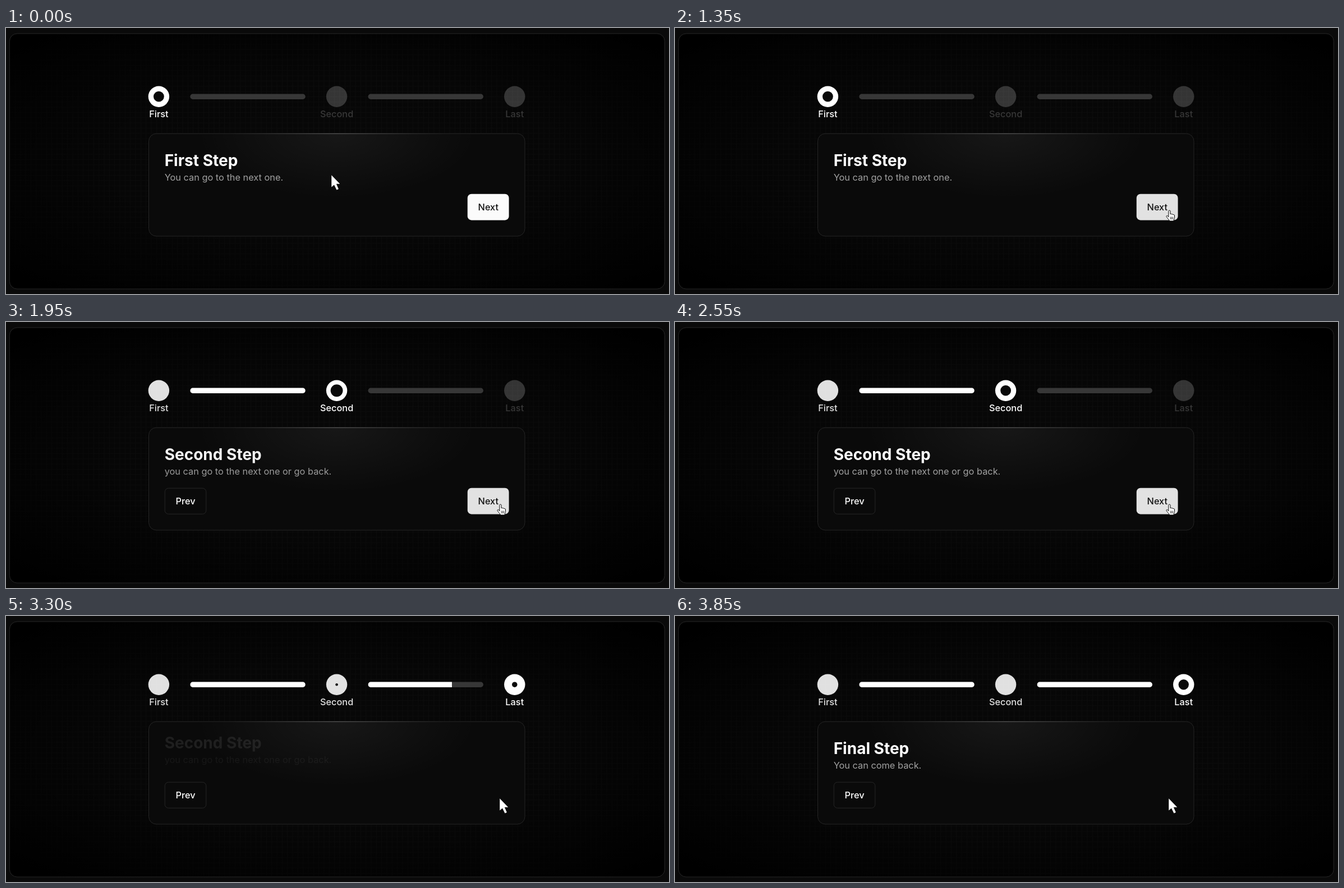
An HTML page for the animation above (3.9 s loop, 1182x474 px).

```html
<!DOCTYPE html>
<html lang="en">
<head>
<meta charset="utf-8">
<title>Stepper</title>
<style>
  html, body { margin: 0; width: 100%; height: 100%; overflow: hidden; background: #0a0a0a; }
  svg { display: block; width: 1182px; height: 474px; }
  text { font: 500 16.33px Inter, sans-serif; fill: #fff; }
  .mid { text-anchor: middle; }
  #title { font-size: 28px; font-weight: 700; }
  #note { font-weight: 400; fill: #a1a1a1; }
</style>
</head>
<body>
<svg viewBox="0 0 1182 474">
  <defs>
    <pattern id="grid" width="9.333" height="9.333" patternUnits="userSpaceOnUse" x="6.5" y="10">
      <path d="M.5 0V9.333M0 .5H9.333" stroke="#fff" stroke-opacity=".035"/>
    </pattern>
    <radialGradient id="vignette" cx=".5" cy=".5" r=".66">
      <stop offset="0" stop-opacity=".25"/>
      <stop offset=".5" stop-opacity=".4"/>
      <stop offset="1" stop-opacity="1"/>
    </radialGradient>
    <radialGradient id="glow" gradientUnits="userSpaceOnUse" cx="0" cy="0" r="1"
      gradientTransform="translate(589.7 188) scale(250 116)">
      <stop offset="0" stop-color="#fff" stop-opacity=".055"/>
      <stop offset="1" stop-color="#fff" stop-opacity="0"/>
    </radialGradient>
    <linearGradient id="shine">
      <stop offset="0" stop-color="#fff" stop-opacity="0"/>
      <stop offset=".5" stop-color="#fff" stop-opacity=".25"/>
      <stop offset="1" stop-color="#fff" stop-opacity="0"/>
    </linearGradient>
    <clipPath id="tracks">
      <rect x="328.3" y="117.6" width="205.5" height="9.3" rx="4.65"/>
      <rect x="645.5" y="117.6" width="205.5" height="9.3" rx="4.65"/>
    </clipPath>
  </defs>

  <rect width="1182" height="474" fill="#0a0a0a"/>
  <g id="panel">
    <rect x="6.3" y="10" width="1168" height="455" rx="13.5" fill="#0a0a0a"/>
    <rect x="6.3" y="10" width="1168" height="455" rx="13.5" fill="url(#grid)"/>
    <rect x="6.3" y="10" width="1168" height="455" rx="13.5" fill="url(#vignette)" stroke="#272727"/>
  </g>

  <g id="steps"></g>
  <g id="bars" clip-path="url(#tracks)">
    <rect x="320" y="116" width="540" height="13" fill="#373737"/>
  </g>

  <rect x="254.5" y="188.2" width="670.5" height="182.8" rx="13.5" fill="#0a0a0a"/>
  <rect x="254.5" y="188.2" width="670.5" height="182.8" rx="13.5" fill="url(#glow)" stroke="#252525"/>
  <rect x="400" y="187.7" width="380" height="1.2" fill="url(#shine)"/>

  <g id="copy">
    <text id="title" x="282.7" y="245.8"></text>
    <text id="note" x="282.7" y="271.7"></text>
  </g>
  <g id="prev">
    <rect x="283.2" y="296.2" width="73.6" height="46" rx="6.5" fill="#0a0a0a" stroke="#262626"/>
    <text class="mid" x="320" y="325.4">Prev</text>
  </g>
  <g id="next">
    <rect id="nextFace" x="822.8" y="295.7" width="73.8" height="46.7" rx="7"/>
    <text class="mid" x="859.8" y="325.4" style="fill:#111">Next</text>
  </g>

  <path id="arrow" d="M0 0V21.3L4.7 17.2 9.2 26.3 12.6 24.7 8.6 15.5H15Z" fill="#fff"/>
  <g id="hand" stroke="#000" stroke-linejoin="round" stroke-linecap="round">
    <path fill="#fff" d="M4.6 12V2.3a1.6 1.6 0 0 1 3.2 0V7.4a1.5 1.5 0 0 1 2.5.4
      1.5 1.5 0 0 1 2.5.7 1.5 1.5 0 0 1 2.4 1.2V13.5C15.2 16 13.8 17 13.7 19.6H6.3
      C5.9 17.4 3.2 15.6 1 12.2 0 10.5 1.8 9.4 3.2 10.7Z"/>
    <path d="M8 12.6V16.4M10.2 12.6V16.4M12.4 12.6V16.4" stroke-width=".8"/>
  </g>
</svg>
<script>
const LOOP = 3900, TICK = 50;
const CLICKS = [1583, 3170];
const LABELS = ["First", "Second", "Last"];
const CENTERS = [272.4, 589.6, 906.8];
const BAR_X = [328.3, 645.5], BAR_WIDTH = 205.5, DOT = 9.4;
const COPY = [
  ["First Step", "You can go to the next one."],
  ["Second Step", "you can go to the next one or go back."],
  ["Final Step", "You can come back."],
];
const WAITING = 0.19, DONE = 0.88;

const $ = id => document.getElementById(id);
const clamp = x => Math.min(1, Math.max(0, x));
const mix = (a, b, k) => a + (b - a) * k;

function add(parent, tag, attrs, text = "") {
  const el = document.createElementNS("http://www.w3.org/2000/svg", tag);
  for (const key in attrs) el.setAttribute(key, attrs[key]);
  el.textContent = text;
  return parent.appendChild(el);
}

// cubic-bezier(.25, .1, .25, 1), solved by bisection
function ease(x) {
  if (x <= 0 || x >= 1) return clamp(x);
  let lo = 0, hi = 1, s;
  for (let i = 0; i < 20; i++) {
    s = (lo + hi) / 2;
    const at = 0.75 * s * (1 - s) + s ** 3;
    if (at < x) lo = s; else hi = s;
  }
  return 0.3 * (1 - s) ** 2 * s + 3 * (1 - s) * s * s + s ** 3;
}
const tween = (t, start, duration) => ease((t - start) / duration);

// Springs take seconds: one overshoots, the other dies away
function spring(s) {
  if (s <= 0) return 0;
  const a = Math.sqrt(75) * s;
  return 1 - Math.exp(-5 * s) * (Math.cos(a) + Math.sin(a) / Math.sqrt(3));
}
const decay = s => s <= 0 ? 1 : (1 + 21 * s) * Math.exp(-21 * s);

const steps = LABELS.map((label, i) => {
  const group = add($("steps"), "g", {});
  add(group, "circle", { cx: CENTERS[i], cy: 122.2, r: 18.7, fill: "#fff" });
  const dot = add(group, "circle", { cx: CENTERS[i], cy: 122.2, fill: "#0a0a0a" });
  add(group, "text", { x: CENTERS[i], y: 158.8, class: "mid" }, label);
  return { group, dot };
});
const fills = BAR_X.map(x => add($("bars"), "rect", { x, y: 116, height: 13, fill: "#fff" }));

function show(id, visible) {
  $(id).style.display = visible ? "" : "none";
}

function drawSteps(t) {
  steps.forEach(({ group, dot }, i) => {
    const enter = i ? CLICKS[i - 1] : -LOOP;
    const leave = CLICKS[i] ?? Infinity;
    const lit = mix(WAITING, 1, tween(t, enter, 150));
    group.setAttribute("opacity", mix(lit, DONE, tween(t, leave, 150)));
    const size = spring((t - enter) / 1000) * decay((t - leave) / 1000);
    dot.setAttribute("r", size < 0.01 ? 0 : DOT * size);
  });
  fills.forEach((fill, i) => fill.setAttribute("width", BAR_WIDTH * tween(t, CLICKS[i], 300)));
}

function drawCopy(t) {
  const EXIT = 200, ENTER_DELAY = 220, SHIFT = 10.5;
  const index = CLICKS.filter(c => t >= c + EXIT).length;
  const enter = index ? tween(t, CLICKS[index - 1] + ENTER_DELAY, 200) : 1;
  const exit = index < 2 ? tween(t, CLICKS[index], EXIT) : 0;
  [$("title").textContent, $("note").textContent] = COPY[index];
  $("copy").setAttribute("opacity", enter * (1 - exit));
  $("copy").setAttribute("transform", `translate(0 ${SHIFT * (1 - enter - exit)})`);
}

function drawPointer(t) {
  const drift = tween(t, 0, 250);
  const k = clamp((t - 700) / 400), travel = k * k * (3 - 2 * k);
  const x = mix(580 + 6 * drift, 880, travel);
  const y = mix(262 + 4 * drift, 325, travel);
  const hovering = x > 823 && t < CLICKS[1];
  const nudge = t < 1350 ? 1 : 0;
  show("arrow", !hovering);
  show("hand", hovering);
  $("arrow").setAttribute("transform", `translate(${x + 0.3} ${y + 0.3})`);
  $("hand").setAttribute("transform", `translate(${x - 4.7 + nudge} ${y - 0.7 + nudge})`);
  const shade = Math.round(mix(251, 226, tween(t, 950, 150)));
  $("nextFace").setAttribute("fill", `rgb(${shade},${shade},${shade})`);
}

function draw(now) {
  const t = Math.floor((now % LOOP) / TICK) * TICK;
  drawSteps(t);
  drawCopy(t);
  drawPointer(t);
  show("prev", t >= CLICKS[0]);
  show("next", t < CLICKS[1]);
}

const start = performance.now();
function frame() {
  draw(performance.now() - start);
  requestAnimationFrame(frame);
}
frame();
</script>
</body>
</html>
```
